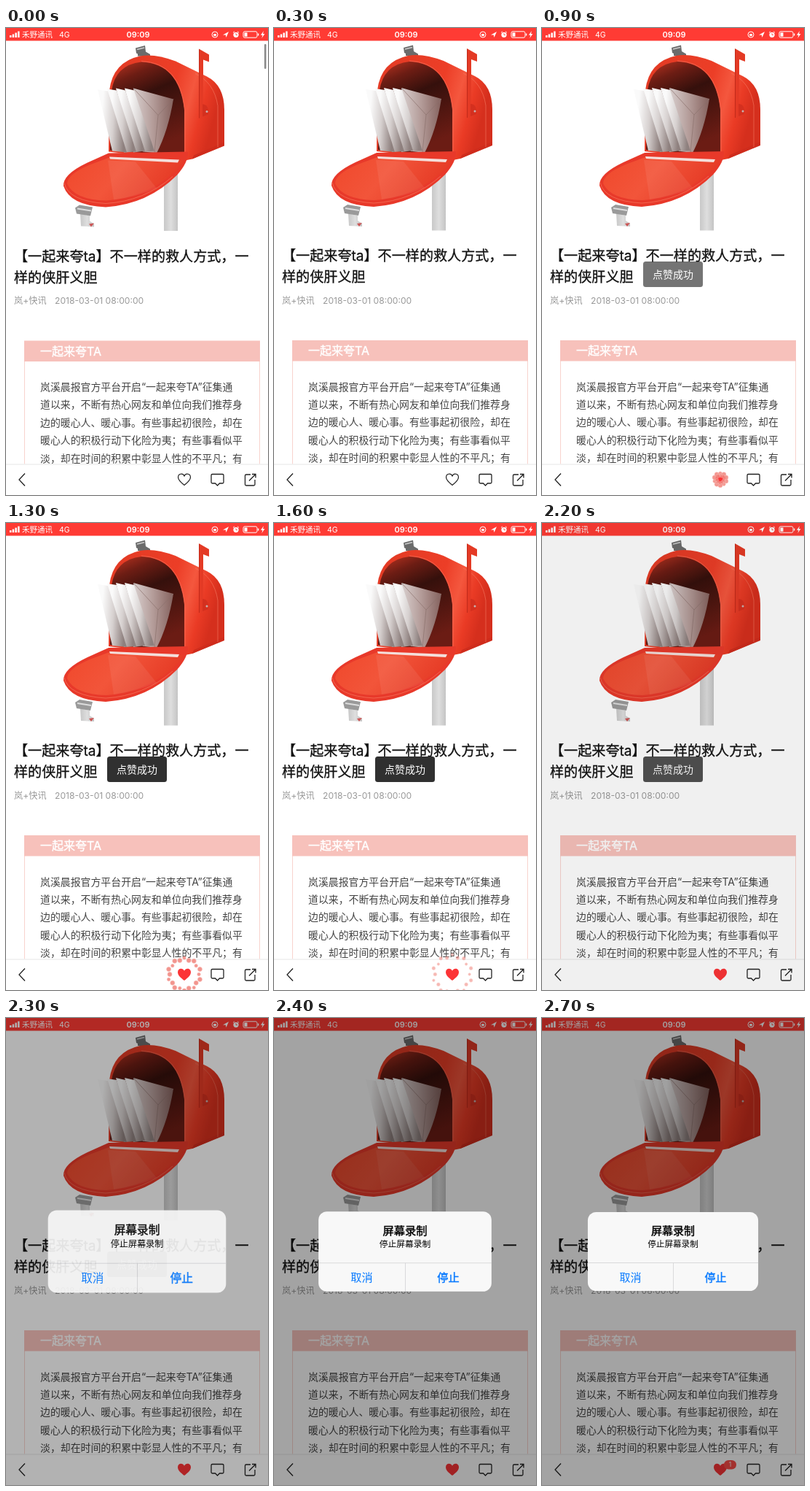
An HTML page for the animation above (2800 ms loop, 360 by 640 pixels).

```html
<!DOCTYPE html>
<html lang="zh-CN">
<head>
<meta charset="utf-8">
<style>
html, body { margin: 0; width: 100%; height: 100%; overflow: hidden; background: #fff; }
svg { display: block; width: 360px; height: 640px; font-family: Inter, "Noto Sans CJK SC", "Noto Sans CJK", sans-serif; }
.mid { text-anchor: middle; }
.line { fill: none; stroke: #222; stroke-width: 1.3; }
.title { font-size: 19.1px; fill: #111; stroke: #111; stroke-width: .3; }
.meta { fill: #999; }
.body { font-size: 13.9px; fill: #444; }
.icon { fill: none; stroke: #fff; stroke-width: 1; }
</style>
</head>
<body>
<svg viewBox="0 0 360 640">
  <defs>
    <linearGradient id="red" x2="1" y2=".25">
      <stop offset="0" stop-color="#e23a24"/><stop offset=".6" stop-color="#ec3e27"/>
      <stop offset=".76" stop-color="#f4573e"/><stop offset=".88" stop-color="#ea3b25"/><stop offset="1" stop-color="#d52f1d"/>
    </linearGradient>
    <linearGradient id="inside" x2=".35" y2="1">
      <stop offset="0" stop-color="#c23522"/><stop offset=".22" stop-color="#6d1d14"/>
      <stop offset=".45" stop-color="#35100c"/><stop offset="1" stop-color="#6b1c14"/>
    </linearGradient>
    <linearGradient id="door" x2="1" y2=".3">
      <stop offset="0" stop-color="#f0482b"/><stop offset=".5" stop-color="#f2553a"/><stop offset="1" stop-color="#e53a25"/>
    </linearGradient>
    <linearGradient id="metal" x2="1">
      <stop offset="0" stop-color="#c8c8c8"/><stop offset=".5" stop-color="#dedede"/><stop offset="1" stop-color="#c4c4c4"/>
    </linearGradient>
    <linearGradient id="paper" x2="1" y2=".15">
      <stop offset=".2" stop-color="#fafafa"/><stop offset=".6" stop-color="#d6d0cf"/><stop offset="1" stop-color="#8e807e"/>
    </linearGradient>
    <linearGradient id="shaded" x2="1">
      <stop offset="0" stop-color="#d9d0cf"/><stop offset=".5" stop-color="#b39b98"/><stop offset="1" stop-color="#85625e"/>
    </linearGradient>
    <path id="heart" d="M0 8.5C-4 5.5-9 1.5-9-2.8C-9-8.8-2-9.2 0-4.8C2-9.2 9-8.8 9-2.8C9 1.5 4 5.5 0 8.5Z"/>
  </defs>
  <rect width="360" height="640" fill="#fff"/>

  <g id="mailbox">
    <path d="M217 190H236V277.500H217Z" fill="url(#metal)"/>
    <path d="M178 27L191 23.500L192 32L198 35.500V39L181 38V35L179 34Z" fill="#6b6b6b"/>
    <path d="M180 29L190 26.500" stroke="#ccc" stroke-width="1.500"/>
    <path d="M141 169L142 85Q147 46 184 38Q204 34 233 45L276 66Q300 78 300 112V160L256 179L246 181Z" fill="url(#red)"/>
    <path d="M258 174L300 156V161L256 179Z" fill="#cf2c1c"/>
    <path d="M260 62Q286 74 291 106V163" fill="none" stroke="#f67a63" opacity=".6"/>
    <path d="M143 167L145 86Q150 50 186 46Q238 48 245 112V175Z" fill="url(#inside)"/>
    <path d="M246 175V112Q239 47 186 45" fill="none" stroke="#f4604a"/>
    <path d="M175 82L230 97Q223 140 207 171L190 169Z" fill="url(#shaded)"/>
    <path d="M175 82L209 119L230 97M209 119L204 170" fill="none" stroke="#8c716e" stroke-width=".7"/>
    <g fill="url(#paper)">
      <path d="M163 82L176 85L204 168L188 169Z"/>
      <path d="M151 82L164 85L191 168L175 170Z"/>
      <path d="M139 83L152 85L179 169L162 170Z"/>
      <path d="M126 84L140 86L166 170L146 168Z"/>
    </g>
    <path d="M141 171L250 169Q251 183 235 201Q195 241 137 245Q88 243 79 216Q78 200 112 184Z" fill="#e8392a"/>
    <path d="M142 177L244 181Q239 191 228 200Q190 232 138 236Q94 235 84 213Q84 200 115 187Z" fill="url(#door)"/>
    <path d="M140 181L178 183L207 219Q179 231 148 235Z" fill="#fff" opacity=".07"/>
    <path d="M142 176L238 180L236 184L143 179Z" fill="#f4dfdb"/>
    <path d="M80 212Q86 237 137 240Q190 237 229 203" fill="none" stroke="#f57059" stroke-width=".8"/>
    <path d="M102 254L115 257L115 264L121 268V272L103 271Z" fill="url(#metal)"/>
    <path d="M95 246L101 242L119 245L116 257L97 254Z" fill="#9a9a9a"/>
    <path d="M98 247L117 250" stroke="#ddd" stroke-width="2"/>
    <path d="M114 268L121 267L117 272Z" fill="#c55"/>
    <path d="M265 28L279 36V46L271 43V123H265Z" fill="#e43a25"/>
    <path d="M265.500 29V123" stroke="#c12a1a"/>
    <path d="M270 104Q279 104 278 118L270 121Z" fill="#d4301f"/>
    <circle cx="276" cy="114" r="1.500" fill="#c9b0ad"/>
  </g>

  <g id="page">
    <text class="title" x="11" y="319">【一起来夸ta】不一样的救人方式，一</text>
    <text class="title" x="11" y="348">样的侠肝义胆</text>
    <text class="meta" x="11" y="377.5" font-size="12.2">岚+快讯</text>
    <text class="meta" x="67" y="377.5" font-size="12.1">2018-03-01 08:00:00</text>
    <path d="M25.5 440V640M348.500 440V640" stroke="#f8d3ce"/>
    <rect x="25" y="428" width="324" height="28.500" fill="#f7c1bb"/>
    <text x="47" y="448" font-size="16" fill="#fff" stroke="#fff" stroke-width=".4">一起来夸TA</text>
    <g id="lines" class="body"></g>
  </g>

  <rect id="scrollbar" x="355" y="22" width="2.500" height="34" rx="1.2" fill="#888"/>

  <rect width="360" height="17.5" fill="#ff3b34"/>
  <g fill="#fff">
    <path d="M5 10h2.500v3h-2.500zM8.700 8.500h2.500V13h-2.500zM12.400 6.500h2.500V13h-2.500zM16.100 4.500h2.500V13h-2.500z"/>
    <text x="22" y="13" font-size="10.500">禾野通讯</text>
    <text x="73" y="13" font-size="10.500">4G</text>
    <text class="mid" x="181.500" y="13" font-size="11" font-weight="600">09:09</text>
    <circle class="icon" cx="287" cy="9" r="4"/><rect x="285.200" y="8" width="3.600" height="3"/>
    <path d="M298 9.500L306 5L302.500 13L301.800 9.500Z"/>
    <circle cx="316" cy="9.300" r="3.600"/><path d="M312 6.500L314 4.700M318 4.700L320 6.500" stroke="#fff"/>
    <path d="M316 7V9.500H318" fill="none" stroke="#ff3b34" stroke-width=".8"/>
    <rect class="icon" x="326" y="4.800" width="19" height="8.400" rx="2"/>
    <rect x="327.500" y="6.300" width="4" height="5.400"/><rect x="346" y="7.500" width="1.300" height="3"/>
    <path d="M354 4L350 9.700H352.500L351.300 14L355.500 8H353Z"/>
  </g>

  <rect y="597.5" width="360" height="43" fill="#fff"/>
  <path d="M0 598H360" stroke="#e6e6e6"/>
  <g class="line">
    <path d="M26 610.500L18 619L26 627.500"/>
    <path d="M283.500 611.500H297.500Q299 611.500 299 613V622.500Q299 624 297.500 624H293.500L290.500 627L287.500 624H283.500Q282 624 282 622.500V613Q282 611.500 283.500 611.500Z"/>
    <path d="M336 612H330Q328.500 612 328.500 613.500V625.500Q328.500 627 330 627H340.500Q342 627 342 625.500V619M334 620.500L342.500 612M338 611.500H343V616.500"/>
    <use id="outline" href="#heart" transform="translate(245 618.5) scale(.94)"/>
  </g>
  <use id="liked" href="#heart" fill="#fc3436"/>
  <g id="ring" fill="#f0837b" stroke="#f6aaa3" stroke-width=".6"></g>
  <g id="badge">
    <rect x="250" y="606" width="17" height="12.500" rx="6.2" fill="#ff4d48"/>
    <text class="mid" x="258.500" y="615.300" font-size="8.500" fill="#fff">1</text>
  </g>

  <g id="toast">
    <rect x="139" y="320" width="82" height="35" rx="3.5" fill="#303030"/>
    <text class="mid" x="180" y="342.500" font-size="14" fill="#fff">点赞成功</text>
  </g>

  <rect id="dim" width="360" height="640"/>
  <g id="alert">
    <rect x="63" y="266" width="234" height="108" rx="11.5" fill="#f8f8f8"/>
    <path d="M63 335.500H297M180.500 335.500V374" stroke="#d2d2d4" stroke-width=".8"/>
    <g class="mid">
      <text x="180" y="297.500" font-size="15" stroke="#000" stroke-width=".4">屏幕录制</text>
      <text x="180" y="314.500" font-size="11.600">停止屏幕录制</text>
      <text x="121.500" y="360.500" font-size="15" fill="#087aff">取消</text>
      <text x="238.500" y="360.500" font-size="15" fill="#087aff" stroke="#087aff" stroke-width=".45">停止</text>
    </g>
  </g>
</svg>
<script>
const LOOP = 2800, STEP = 100, DOTS = 20;
const $ = id => document.getElementById(id);
const clamp = v => Math.min(1, Math.max(0, v));
const ramp = (t, from, to) => clamp((t - from) / (to - from));
const fade = (id, opacity) => $(id).setAttribute('opacity', opacity);
const move = (id, value) => $(id).setAttribute('transform', value);

function add(parent, tag, attrs) {
  const node = document.createElementNS('http://www.w3.org/2000/svg', tag);
  for (const key in attrs) node.setAttribute(key, attrs[key]);
  return parent.appendChild(node);
}

[
  '岚溪晨报官方平台开启“一起来夸TA”征集通',
  '道以来，不断有热心网友和单位向我们推荐身',
  '边的暖心人、暖心事。有些事起初很险，却在',
  '暖心人的积极行动下化险为夷；有些事看似平',
  '淡，却在时间的积累中彰显人性的不平凡；有'
].forEach((text, i) => add($('lines'), 'text', { x: 47, y: 496.5 + i * 24.4 }).textContent = text);

const dots = Array.from({ length: DOTS }, () => add($('ring'), 'circle', {}));

function drawRing(t) {
  const radius = 28 * (1 - Math.exp(-(t - 800) / 360));
  const life = clamp((2200 - t) / 900);
  fade('ring', t > 800 ? life * .85 : 0);
  dots.forEach((dot, i) => {
    const angle = i / DOTS * 2 * Math.PI;
    const r = radius + (i % 2 ? 1.5 : -1) * (2 - life);
    dot.setAttribute('cx', 245 + r * Math.cos(angle));
    dot.setAttribute('cy', 618.5 + r * Math.sin(angle));
    dot.setAttribute('r', (1 + 2 * life) * (i % 3 ? 1 : .75));
  });
}

function draw(t) {
  const settle = 1 - ramp(t, 0, 300);
  move('page', `translate(0 ${settle / 2})`);
  move('mailbox', `translate(0 ${settle / 2})`);
  fade('scrollbar', settle);

  fade('outline', t < 700 ? 1 : 0);
  fade('liked', t < 700 ? 0 : 1);
  move('liked', `translate(245 618.5) scale(${ramp(t, 600, 1000)})`);
  drawRing(t);
  fade('badge', t >= 2600 ? 1 : 0);
  fade('toast', ramp(t, 700, 1000) * (1 - ramp(t, 2150, 2450)));

  fade('dim', .36 * ramp(t, 2175, 2325));
  fade('alert', ramp(t, 2200, 2310));
  const scale = 1 + .13 * Math.exp(-Math.max(0, t - 2200) / 95);
  move('alert', `translate(180 320) scale(${scale}) translate(-180 -320)`);
}

function tick() {
  const t = performance.now() % LOOP;
  draw(Math.floor(t / STEP) * STEP);
  requestAnimationFrame(tick);
}
tick();
</script>
</body>
</html>
```
